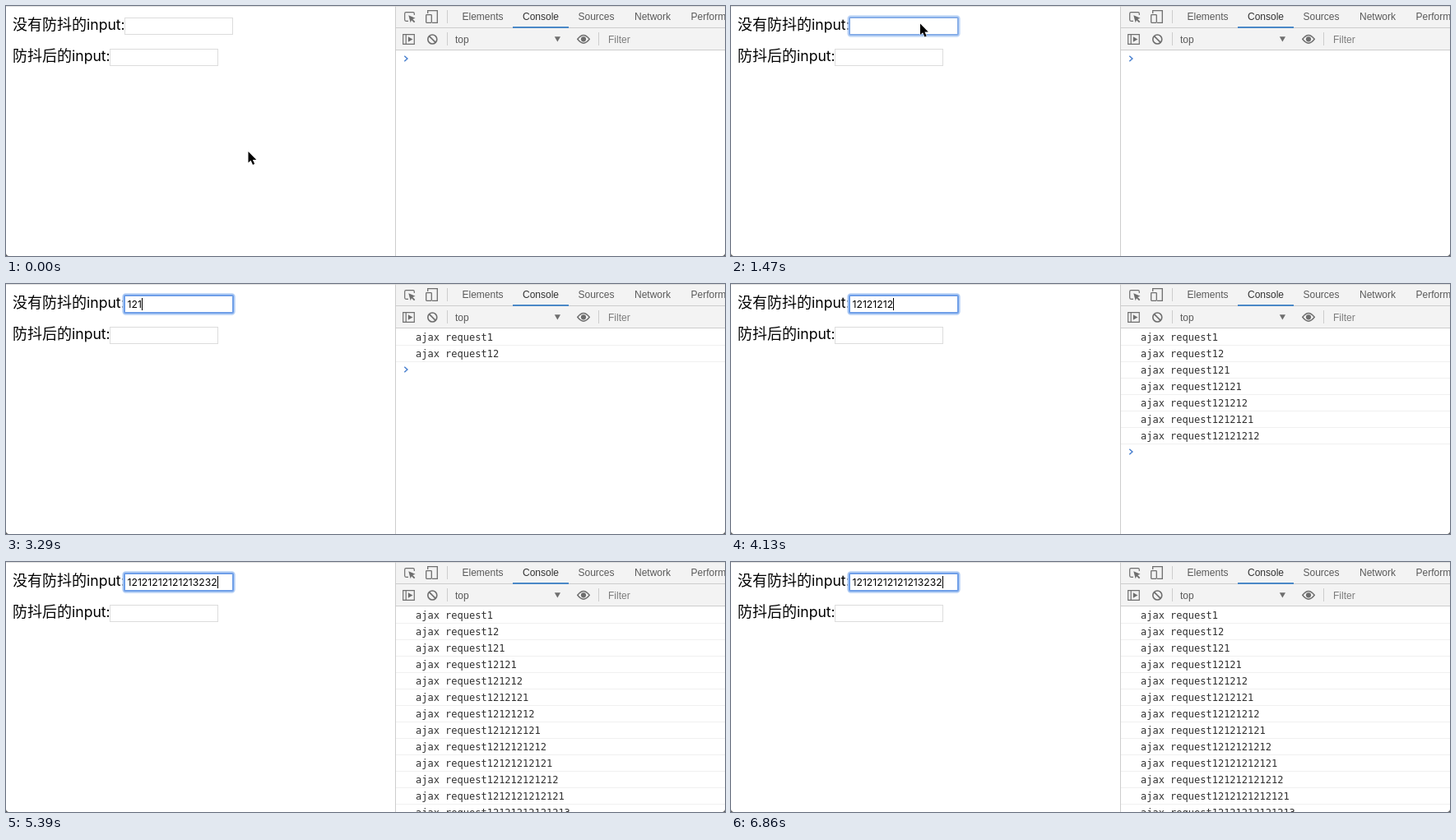
Write an HTML page that moves like this. It is 874 px wide and 304 px high and loops after 6930 ms.

```html
<!DOCTYPE html>
<html lang="zh">
<head>
<meta charset="utf-8">
<title>Debounce demo</title>
<style>
  html, body { margin: 0; width: 100%; height: 100%; overflow: hidden; background: #fff; }
  svg { display: block; width: 874px; height: 304px; }
  .label { font: 18px "Noto Sans CJK SC", "Noto Sans CJK", sans-serif; fill: #000; }
  .latin { font: 17.6px Inter, sans-serif; }
  .typed { font: 12.2px Inter, sans-serif; fill: #000; }
  .ui { font: 12px "Liberation Sans", Arial, sans-serif; fill: #5a5a5a; }
  .log { font: 12px "DejaVu Sans Mono", monospace; fill: #303030; white-space: pre; }
  .icon { fill: none; stroke: #6e6e6e; stroke-width: 1.4; }
  .solid { fill: #6e6e6e; }
  .field { fill: #fff; stroke: #dcdcdc; }
</style>
</head>
<body>
<svg viewBox="0 0 874 304">
  <rect width="874" height="304" fill="#fff"/>

  <text class="label" x="8" y="29">没有防抖的<tspan class="latin" x="98">input:</tspan></text>
  <text class="label" x="8" y="67">防抖后的<tspan class="latin" x="80">input:</tspan></text>
  <rect class="field" x="144.5" y="14.5" width="131" height="20"/>
  <rect class="field" x="126.5" y="52.5" width="131" height="20"/>
  <g id="ring" fill="none">
    <rect x="143" y="13" width="134" height="23" rx="2.5" stroke="#b4cff5" stroke-width="3.4"/>
    <rect x="144" y="14" width="132" height="21" rx="1" stroke="#6f9fe8" stroke-width="2"/>
  </g>
  <text id="typed" class="typed" x="147.5" y="29"></text>
  <rect id="caret" y="17" width="1" height="15"/>

  <g id="console"></g>
  <path id="prompt" d="M484.3 -3.2l3.6 3.2l-3.6 3.2" fill="none" stroke="#4a80cf" stroke-width="1.5"/>

  <rect x="474" width="400" height="53" fill="#f3f3f3"/>
  <path d="M474 26.5H874M474 53.5H874M473.5 0V304M536.5 5V21M536.5 32V48M720.5 32V48" stroke="#cdcdcd" fill="none"/>
  <rect x="616" y="25" width="68" height="2" fill="#4a88c7"/>
  <g class="ui">
    <text x="554.5" y="17">Elements</text>
    <text x="628" y="17" fill="#333" style="fill:#333">Console</text>
    <text x="695.5" y="17">Sources</text>
    <text x="764" y="17">Network</text>
    <text x="832.5" y="17">Performance</text>
    <text x="546" y="44.5">top</text>
    <text x="732" y="45" style="fill:#7c7c7c">Filter</text>
  </g>

  <g class="icon">
    <path d="M489 18.3H486.2Q484.7 18.3 484.7 16.8V9.2Q484.7 7.7 486.2 7.7H494.8Q496.3 7.7 496.3 9.2V11" stroke-width="1.2"/>
    <path d="M512.7 9V5.7H524.3V20.3H518" stroke-width="1.3"/>
    <rect x="510.7" y="10.7" width="6.6" height="9.6" rx=".8" stroke-width="1.3"/>
    <path d="M482.7 34.7H496.3V46.3H482.7ZM486.2 34.7V46.3" stroke-width="1.2"/>
    <circle cx="518.3" cy="40.5" r="5.5" stroke-width="1.6"/>
    <path d="M514.4 36.6L522.2 44.4" stroke-width="1.6"/>
    <path d="M694.8 40.3Q702 30.6 709.2 40.3Q702 50 694.8 40.3Z" stroke-width="1.5"/>
  </g>
  <path class="solid" d="M489.3 11.3L497.6 14.8L494.3 16L497.3 19L496 20.3L493 17.3L491.7 20.2Z"/>
  <path class="solid" d="M488.8 37.2L494.4 40.5L488.8 43.8Z"/>
  <path class="solid" d="M666.8 37.3H674L670.4 43.6Z"/>
  <circle class="solid" cx="702" cy="40.3" r="3.1"/>

  <path d="M0 .5H874" stroke="#d2d2d2" opacity=".7"/>
  <path d="M0 301Q.3 303.7 3 304H0ZM874 301Q873.7 303.7 871 304H874Z" fill="#555"/>

  <circle id="click" cx="229.5" cy="21" r="21.3" fill="none" stroke="#111" stroke-width="1.5"/>
  <path id="arrow" d="M0 0V13.6L3.1 10.7L5.5 16L7.7 15L5.4 9.9H9.8Z" fill="#000" stroke="#fff" stroke-width="1" paint-order="stroke"/>
  <g id="beam" fill="none">
    <path d="M223.7 14.3Q227 14.3 227 16.5Q227 14.3 230.3 14.3M227 16V27M223.7 28.7Q227 28.7 227 26.5Q227 28.7 230.3 28.7M225.2 23.7H228.8" stroke="#222" stroke-width="1.2"/>
  </g>
</svg>
<script>
  const LOOP = 6930, TICK = 70, ROW = 20;
  const CHARS = "12121212121213232";
  const keyTimes = [2520, 3080, 3290, 3500, 3640, 3780, 3920, 4130, 4270];
  // [time, number of characters logged]
  const logs = [[2800, 1], [3150, 2], [3500, 3], [3640, 5], [3850, 6], [3990, 7], [4130, 8], [4340, 9]];
  for (let n = 10; n <= CHARS.length; n++) {
    const time = 4480 + (n - 10) * TICK;
    keyTimes.push(time);
    logs.push([time + TICK, n]);
  }

  const el = id => document.getElementById(id);
  const [ring, typed, caret, board, prompt, click, arrow, beam] =
    ["ring", "typed", "caret", "console", "prompt", "click", "arrow", "beam"].map(el);
  const show = (node, opacity) => node.setAttribute("opacity", opacity);
  const clamp = x => Math.max(0, Math.min(1, x));
  // Rises from 0 to 1 in a number of ticks, the first one already visible.
  const ramp = (t, start, steps) => clamp((t - start + TICK) / (steps * TICK));
  const smooth = x => x * x * (3 - 2 * x);

  function add(tag, attrs, parent) {
    const node = document.createElementNS("http://www.w3.org/2000/svg", tag);
    for (const key in attrs) node.setAttribute(key, attrs[key]);
    return parent.appendChild(node);
  }

  const rows = logs.map(([time, count], i) => {
    const row = add("g", {}, board), y = 54 + i * ROW;
    add("text", { class: "log", x: 498, y: y + 15 }, row).textContent =
      "ajax request" + CHARS.slice(0, count);
    add("path", { d: `M474 ${y + 20.5}H874`, stroke: "#f0f0f0" }, row);
    return row;
  });

  function caretOpacity(t) {
    if (t < 1540) return 0;
    if (t < 2520) return 1 - ramp(t, 2030, 3);
    if (t < 5040) return 1;
    return ramp(t, 5250, 3) - ramp(t, 5740, 3) + ramp(t, 6300, 3);
  }

  function draw(time) {
    const t = Math.floor(time / TICK) * TICK;

    const move = smooth(ramp(t, 280, 6));
    const [x0, y0] = t < 70 ? [294.5, 177] : [287.5, 167];
    const x = x0 + (230 - x0) * move, y = y0 + (21.5 - y0) * move;
    arrow.setAttribute("transform", `translate(${x} ${y})`);
    show(arrow, t < 1680 ? 1 : 0);
    show(beam, t >= 1680 && t < 2520 ? 1 : 0);
    show(click, ramp(t, 770, 2) - ramp(t, 1050, 2));
    show(ring, ramp(t, 1260, 5));

    const count = keyTimes.filter(k => k <= t).length;
    typed.textContent = CHARS.slice(0, count);
    const width = count ? typed.getComputedTextLength() : 0;
    caret.setAttribute("x", Math.round(147.5 + width));
    show(caret, caretOpacity(t));

    let shown = 0;
    rows.forEach((row, i) => {
      const on = logs[i][0] <= t;
      show(row, on ? 1 : 0);
      shown += on;
    });
    prompt.setAttribute("transform", `translate(0 ${64 + shown * ROW})`);
  }

  const start = performance.now();
  function loop() {
    draw((performance.now() - start) % LOOP);
    requestAnimationFrame(loop);
  }
  loop();
</script>
</body>
</html>
```
